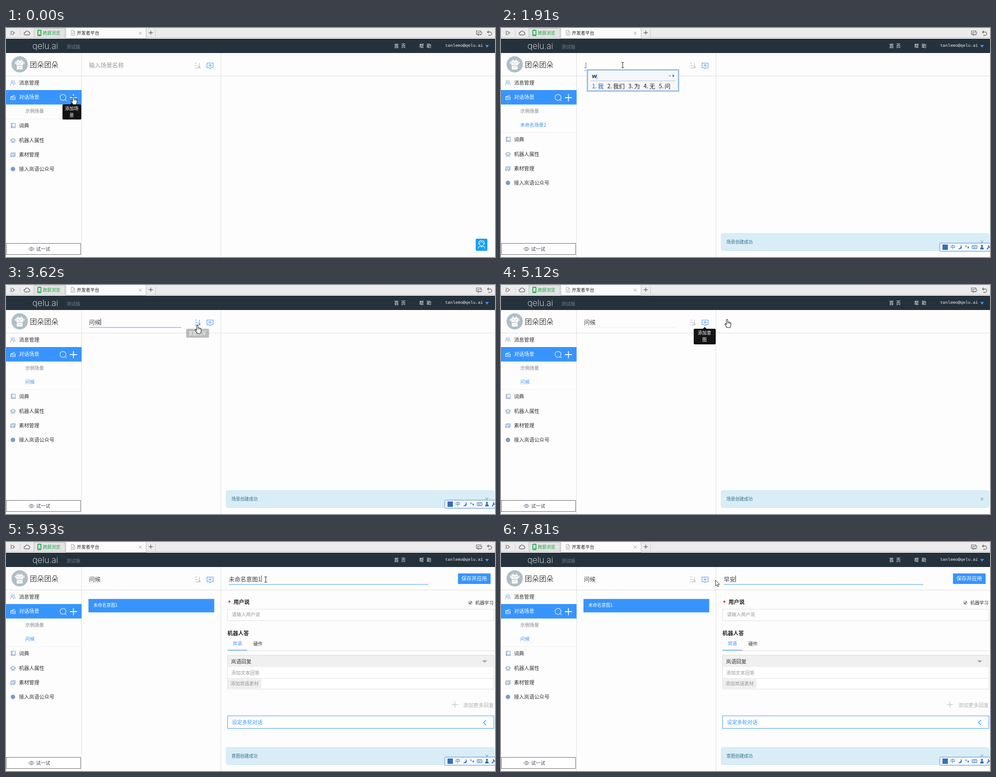
Animation, 1091 px wide and 513 px high, one loop 8 s. Source, as an HTML page:

```html
<!DOCTYPE html>
<html lang="zh-CN">
<head>
<meta charset="utf-8">
<title>开发者平台</title>
<style>
html, body { margin: 0; width: 100%; height: 100%; overflow: hidden; background: #fdfdfd; }
svg { display: block; width: 100vw; height: 100vh; }
text { font-family: "Noto Sans CJK SC", "Noto Sans CJK", "Noto Sans CJK JP", sans-serif; white-space: pre; }
.mono { font-family: "Liberation Mono", monospace; }
.logo { font-family: Inter, Lato, sans-serif; font-weight: 200; }
.typed { font-family: "Liberation Sans", sans-serif; font-weight: 700; }
</style>
</head>
<body>
<svg viewBox="0 0 1091 513" preserveAspectRatio="none"><g id="base"></g><g id="live"></g></svg>
<script>
const LOOP = 8000;
const BLUE = '#3894fd', GREY = '#dcdcdc', INK = '#333', ICON = '#7c9cc6';

// Drawing helpers; text is placed by the middle of its line
const text = (x, mid, size, str, fill = INK, extra = '') =>
  `<text x="${x}" y="${(mid + size * 0.38).toFixed(2)}" font-size="${size}" fill="${fill}" ${extra}>${str}</text>`;
const rect = (x, y, w, h, fill, extra = '') =>
  `<rect x="${x}" y="${y}" width="${w}" height="${h}" fill="${fill}" ${extra}/>`;
const box = (x, y, w, h, stroke, fill = 'none', rx = 0) =>
  rect(x + 0.5, y + 0.5, w - 1, h - 1, fill, `stroke="${stroke}" rx="${rx}"`);
const line = (d, stroke, width = 1, extra = '') =>
  `<path d="${d}" fill="none" stroke="${stroke}" stroke-width="${width}" ${extra}/>`;
const shape = (d, fill, extra = '') => `<path d="${d}" fill="${fill}" ${extra}/>`;
const disc = (x, y, r, fill, extra = '') => `<circle cx="${x}" cy="${y}" r="${r}" fill="${fill}" ${extra}/>`;
const ring = (x, y, r, stroke, width = 1) => disc(x, y, r, 'none', `stroke="${stroke}" stroke-width="${width}"`);
const at = (list, t) => list.filter(k => k[0] <= t).pop();
const within = (t, a, b) => t >= a && t < b;
const BOLD = 'font-weight="700"', MIDDLE = 'text-anchor="middle"';

// [time, kind, x, y]; each position is held until the next
const POINTER = [
  [0, 'hand', 150, 153], [280, 'arrow', 186, 121], [430, 'arrow', 230, 95],
  [560, 'beam', 258, 84], [680, 'beam', 271.5, 83], [3380, 'beam', 330, 86],
  [3500, 'arrow', 396, 90], [3620, 'hand', 427, 90], [3740, 'hand', 447, 83],
  [3890, 'hand', 449.5, 82], [4040, 'hand', 453, 80], [4190, 'hand', 452.5, 82],
  [4880, 'hand', 460, 80], [5000, 'hand', 482, 73], [5120, 'hand', 504.5, 77],
  [5240, 'hand', 528, 74], [5380, 'arrow', 552, 73], [5500, 'beam', 572, 79],
  [5650, 'beam', 580, 80], [5780, 'beam', 581, 84], [5930, 'beam', 579.5, 84],
  [6080, 'beam', 566, 85], [6200, 'beam', 532, 86], [6320, 'beam', 502, 86],
  [6440, 'arrow', 478, 85]
];

// [time, left, typed letters, candidates]
const TYPING = [
  [0], [1910, 193, 'w', '我 我们 为 无 问'], [2060, 193, 'we', '为 我们 未 位 问'],
  [2190, 193, 'wen', '问 问题 文 闻 温'], [2340, 193, "wen'h", '问候 文化 问好 温和 温厚'],
  [2460, 193, "wen'ho", '问候 温厚 问好 问 文'], [2610, 193, "wen'hou", '问候 温厚 问 文 闻'],
  [2920], [7020, 505, 'za', '在 咱们 咱 杂 砸'], [7150, 505, 'zao', '早上 早 找 造 遭'],
  [7420, 505, "zao'a", '早安 早 造 糟 枣'], [7540, 505, "zao'an", '早安 早 造 糟 枣'], [7810]
];

const CURSORS = {
  hand: shape('M-1.6 10V1.4a1.5 1.5 0 0 1 3 0V6q2.4-.8 2.7.6q2-.6 2.4.8q1.9-.3 1.9 1.6V13q0 2-1.4 3.6V18.5H-1V17Q-3 15-4.8 11.2q-.6-1.8 1-1.6 1.2.3 2.2 2z',
    '#fff', 'stroke="#222" stroke-width="1.1"') + line('M1.4 6v4M4.1 7v3M6.5 8v2', '#222', 0.8),
  arrow: shape('M.5 .5V13.5L3.5 10.8L5.5 15.2L7.6 14.2L5.6 10H9.6z', '#fff', 'stroke="#222"'),
  beam: line('M-3-6h2.3L0-5.4L.7-6H3M0-5.4V5.4M-3 6h2.3L0 5.4L.7 6H3', '#222', 1.1)
};

function browserBar() {
  const dim = '#666';
  return rect(0, 0, 1091, 24, '#ececec') + rect(0, 21, 1091, 1, '#b9b9b9') + rect(0, 22, 1091, 2, '#f8f8f8') +
    line('M11.5 6V16M14 7L19 11L14 15', dim, 1.3) + line('M31.5 5V17M333.5 3V21', '#c8c8c8') +
    line('M43.5 15.5a3 3 0 0 1-.3-6a4 4 0 0 1 7.4-.6a3.4 3.4 0 0 1 .2 6.6z', dim, 1.3) +
    box(62, 0, 70, 22, '#bcbcbc', '#e4e4e4') +
    rect(71, 5, 7, 12, 'none', 'stroke="#16a83a" stroke-width="1.8" rx="1"') + rect(73, 14, 3, 1.4, '#16a83a') +
    text(82, 11, 9.75, '跨屏浏览', '#16a83a') +
    box(133, -1, 180, 25, '#bcbcbc', '#fbfbfb') +
    line('M145.5 5.5H150.5L153.5 8.5V16.5H145.5zM150.5 5.5V8.5H153.5M147 11h5M147 13.5h5', '#aaa') +
    text(158, 11, 10, '开发者平台', '#222') +
    line('M296.5 8.5L302.5 14.5M302.5 8.5L296.5 14.5', '#888') +
    line('M318.5 10.5h9M323 6V15', dim, 1.4) +
    line('M1058 14.5H1049.5V6.5H1059.5V9M1061.5 11V9.5H1053V16.5H1056', dim, 1.2) +
    line('M1056.5 13L1059 15.5L1062 12', dim, 1.2) +
    line('M1077 6L1074 9L1077 12M1074.5 9H1080a3.7 3.7 0 0 1 0 7.5H1076', dim, 1.3);
}

function siteHeader() {
  return rect(0, 24, 1091, 32, '#25313b') +
    text(59, 39.5, 19, 'qelu.ai', '#fff', 'class="logo"') +
    text(135, 42, 10.3, '测试版', '#72808b') +
    text(866, 40, 10.3, '首', '#fff') + text(881.5, 40, 10.3, '页', '#fff') +
    text(922, 40, 10.3, '帮', '#fff') + text(938.5, 40, 10.3, '助', '#fff') +
    text(980, 38.8, 9.35, 'tanlemo@qelu.ai', '#f2f2f2', 'class="mono"') +
    shape('M1069 38H1077.5L1073.3 44z', BLUE);
}

function avatar() {
  const skin = '#b0bec5';
  return disc(30.5, 81.5, 18.2, skin) +
    rect(23, 73, 15, 10.5, '#fff', 'rx="1.5"') + rect(20, 75.5, 2, 5, '#fff') + rect(39, 75.5, 2, 5, '#fff') +
    line('M27 73V70M34 73V70', '#fff', 1.4) +
    disc(27, 77, 1.2, skin) + disc(34, 77, 1.2, skin) + line('M28 80.5H33', skin) +
    rect(24, 85, 13, 8, '#fff', 'rx="1"') + line('M28 88.5H33', skin) +
    text(53, 82, 16, '团朵团朵', '#4a4a4a');
}

function drawBase() {
  return rect(0, 0, 1091, 513, '#fdfdfd') + browserBar() + siteHeader() + avatar() +
    rect(0, 107, 1091, 1, GREY) + rect(168, 56, 1, 457, GREY) + rect(479, 56, 1, 457, GREY) +
    ring(13.5, 120.5, 2.3, ICON) +
    line('M10 128q0-5 3.5-5t3.5 5M16 118.5a2.2 2.2 0 1 1 1.5 4q3 .4 3.3 4.5', ICON) +
    text(29, 123, 11.3, '消息管理') +
    rect(0, 139, 168.6, 32.4, BLUE) +
    line('M10.5 154.5H20.5V160.5H10.5zM10.5 154L20 150.5M12 157.5H19', '#fff', 1.1) +
    text(29, 155, 11.3, '对话场景', '#fff') +
    ring(127.2, 155.5, 6.7, '#e8f2ff', 1.2) + line('M132 160.3L135.3 163.6', '#e8f2ff', 1.2) +
    line('M142.5 156H158.5M150.5 148V164', '#fff', 1.8) +
    text(43, 186, 10.4, '示例场景', '#808080') +
    box(0, 482, 167, 26, '#666', '#fff') +
    line('M50.5 495q6-8 12.5 0q-6.5 8-12.5 0z', '#52677f') + ring(56.7, 495, 2.2, '#52677f') +
    text(67, 495, 10.5, '试一试', '#445');
}

function menu(t) {
  const dy = t < 130 ? 0 : 31;
  const added = dy ? text(43, 217, 10.4, t < 2920 ? '未命名场景2' : '问候', BLUE) : '';
  return added + `<g transform="translate(0 ${dy})">` + rect(0, 203, 168, 1, '#ececec') +
    line('M11.5 213.5H20.5V223.5H11.5zM13.5 213.5V221M11.5 221.5H20.5', ICON, 1.1) +
    line('M12.5 248.5H18.5V253.5H12.5zM13 256.5H18M10.5 249V254M20.5 249V254M15.5 246V248M12 257L14 254M19 257L17 254', ICON, 1.1) +
    line('M10.5 281.5H18.5V288.5H10.5zM12.5 281V279.5H20.5V286.5H19M11 287L14 284L18 287', ICON, 1.1) +
    disc(15.5, 316, 5, ICON) +
    ['词典', '机器人属性', '素材管理', '接入岚语公众号'].map((s, i) => text(29, 219 + i * 32.4, 11.3, s)).join('') + '</g>';
}

const caret = x => rect(x, 75, 1, 15, '#333');
const composing = x => line(`M${x + 4.5} 77V89.5H${x + 1}`, '#555');
const underline = (x, w, fill) => rect(x, 94.6, w, 1, fill);

function selected(x, str, from, to) {
  return text(x, 83, 13, str, '#444') + rect(from, 75, to - from, 15, '#3390ff') +
    `<clipPath id="sel">${rect(from, 75, to - from, 15, '#000')}</clipPath>` +
    `<g clip-path="url(#sel)">${text(x, 83, 13, str, '#fff')}</g>`;
}

function sceneTitle(t) {
  let s = '';
  if (within(t, 560, 5240)) s += underline(185, 206, t < 4880 ? BLUE : '#ebebeb');
  if (t < 130) s += text(185, 83, 13, '输入场景名称', '#9a9a9a');
  else if (t < 560) s += text(185, 83, 13, '未命名场景2', '#444');
  else if (t < 1910) s += selected(185, '未命名场景2', 185, 258);
  else if (t < 2920) s += composing(185);
  else s += text(185, 83, 13, '问候', '#444');
  if (within(t, 2920, 3380) || within(t, 3500, 4480)) s += caret(211);
  const sort = within(t, 3620, 3740) ? BLUE : '#b5b5b5';
  return s + line('M421.5 78.5H426M421.5 84.5H428M421.5 89.5H434.5M431.5 78V88M428.8 85.5L431.5 88.5L434.2 85.5', sort, 1.1) +
    line('M448.5 78.5H462V89H457.5L455.3 91L453 89H448.5zM451.5 83.8H459M455.3 80.5V87', BLUE, 1.1);
}

function intentTitle(t, px) {
  let s = t >= 5650 ? underline(497, 445, BLUE) : '';
  if (t < 6080) s += text(497, 83, 13, '未命名意图1', '#444');
  else if (t < 7020) s += selected(497, '未命名意图1', Math.max(497, px), 570);
  else if (t < 7810) s += composing(497);
  else s += text(497, 83, 13, '早安', '#444') + caret(523);
  return within(t, 5650, 6080) ? s + caret(569.5) : s;
}

function intentForm() {
  const hint = '#969696';
  return rect(1008.4, 70.4, 72.8, 23.6, BLUE) + text(1016, 82, 11.4, '保存并应用', '#fff') +
    text(495, 136, 13, '*', '#e00', BOLD) + text(507.5, 134, 12, '用户说', '#222', BOLD) +
    box(1032, 132, 8, 8, '#888', '#fff', 1) + line('M1033.5 136L1035.5 138L1038.5 133.5', '#222', 1.3) +
    text(1047, 136, 10.2, '机器学习') +
    box(494, 150, 595, 27, GREY, '#fff') + text(504, 162, 10.5, '请输入用户说', hint) +
    text(494, 204, 12, '机器人答', '#222', BOLD) +
    text(506, 227, 10.2, '岚语', BLUE) + text(552, 228, 10.2, '硬件') +
    rect(494, 243, 595, 1, GREY) + rect(494, 241.7, 44, 1.2, BLUE) +
    box(494, 253, 595, 77, GREY, '#fff') + rect(495, 254, 593, 26, '#f0f0f1') +
    text(502, 268, 11.4, '岚语回复') + shape('M1062.5 265H1073.5L1068 270.5z', '#a9a9a9') +
    text(502.5, 293, 10.5, '添加文本回答', hint) + rect(495, 305, 593, 1, GREY) +
    rect(495, 307, 75, 21, '#efeff0') + text(501, 317.5, 10.5, '添加岚语素材', hint) +
    line('M995 364.5H1008.5M1001.5 358V371', '#bbb', 1.2) + text(1020, 366, 11.4, '添加更多回复', '#b0b0b0') +
    box(494, 389, 595, 29, BLUE, '#fff') + text(504, 403.5, 11.4, '设定多轮对话', BLUE) +
    line('M1071 399L1065.5 404.5L1071 410', BLUE, 1.5);
}

function helpButton() {
  return rect(1048, 472, 26, 27, '#149ffb', 'rx="2"') + ring(1061, 483.5, 4.5, '#fff', 1.2) +
    line('M1054.5 485V482a6.5 6 0 0 1 13 0V485M1053.5 494q1-5 5-5.5L1061 491L1063.5 488.5q4 .5 5 5.5', '#fff', 1.2);
}

const toast = str => box(491, 460, 598, 39, '#bfe5ee', '#d9edf7', 3) + text(503, 479, 9.75, str, '#31708f') +
  line('M1070 476.5L1076 482.5M1076 476.5L1070 482.5', '#9bb0ba', 1.5);

function inputBar() {
  const c = '#3470b8';
  return box(978, 481, 120, 20, '#86aee0', '#f6faff', 2) + box(979, 482, 119, 18, '#a9c6ea') +
    rect(985, 485, 12, 12, c) + text(1002.5, 491, 11, '中', c) +
    shape('M1025 486q3.5 6-5.5 9q9 2 8.5-5q-.5-3-3-4z', c) +
    ring(1037.5, 489, 1.5, c) + shape('M1041 490h3q0 4-3 4.5q1.5-1.5 0-2.5z', c) +
    rect(1051, 487.5, 11, 7, '#dbe8f8', `stroke="${c}" rx="1"`) + line('M1053 490H1060.5M1054 492.5H1059', c, 1, 'stroke-dasharray="1.5 1"') +
    disc(1073, 488, 2.3, c) + shape('M1069 496q0-5.5 4-5.5t4 5.5z', c) +
    line('M1084 496L1089 490M1088 486.5q-1.5 3 1.5 4.5l2-.5', c, 2);
}

function tooltip(x, y, w, h, mid, lines, alpha) {
  const cx = x + w / 2;
  return `<g opacity="${alpha}">` + rect(x, y, w, h, '#141414', 'rx="2.5"') +
    shape(`M${cx - 4} ${y}L${cx} ${y - 4}L${cx + 4} ${y}z`, '#141414') +
    lines.map((s, i) => text(cx - 0.5, mid + i * 15, 10, s, '#fff', MIDDLE)).join('') + '</g>';
}

function candidates([, left, typed, words]) {
  if (!typed) return '';
  let x = left + 10, row = '';
  words.split(' ').forEach((word, i) => {
    const fill = i ? '#222' : '#2a5cb8';
    row += text(x, 130, 13, `${i + 1}.`, fill) + text(x + 13, 130, 13, word, fill);
    x += 21 + word.length * 13;
  });
  const right = x + 12, w = right - left;
  return rect(left - 2, 92, w + 2, 51, '#b3d2f2') + box(left, 94, w - 2, 47, '#6f9dd0', '#f5f7fa') +
    `<text class="typed" x="${left + 10}" y="111.5" font-size="13.3" fill="#222">${typed}<tspan font-weight="400" fill="${BLUE}" dx="-1">|</tspan></text>` +
    rect(left + 7, 118, w - 16, 1, '#a8bfd8') +
    shape(`M${right - 20} 104V110L${right - 24} 107z`, '#9dbbe0') +
    shape(`M${right - 15} 103.5V110.5L${right - 11} 107z`, '#2f6fbd') + row;
}

function drawLive(t) {
  const [, kind, px, py] = at(POINTER, t);
  let s = menu(t) + sceneTitle(t);
  if (t < 130) s += helpButton();
  if (t >= 5380) {
    s += `<g opacity="${t < 5650 ? 0.5 : 1}">` + rect(184, 127.6, 280.6, 30, BLUE) +
      text(195, 141.5, 9.75, '未命名意图1', '#fff') + '</g>' + intentForm() + intentTitle(t, px);
  }
  if (t >= 130) s += toast(t < 5380 ? '场景创建成功' : '意图创建成功');
  if (within(t, 560, 4880) || t >= 5500) s += inputBar();
  if (t < 430) s += tooltip(126, 171, 42, 34, 180, ['添加场', '景'], t < 280 ? 1 : 0.5);
  if (within(t, 3620, 3740)) s += tooltip(402, 98, 51, 20, 108, ['意图排序'], 0.28);
  if (within(t, 4040, 5240)) s += tooltip(430, 98, 49, 35, 107, ['添加意', '图'], 1);
  return s + candidates(at(TYPING, t)) + `<g transform="translate(${px} ${py})">${CURSORS[kind]}</g>`;
}

const live = document.getElementById('live');
document.getElementById('base').innerHTML = drawBase();
const start = performance.now();
let shown = '';
function tick(now) {
  const next = drawLive(Math.max(0, now - start) % LOOP);
  if (next !== shown) live.innerHTML = shown = next;
  requestAnimationFrame(tick);
}
tick(start);
</script>
</body>
</html>
```
